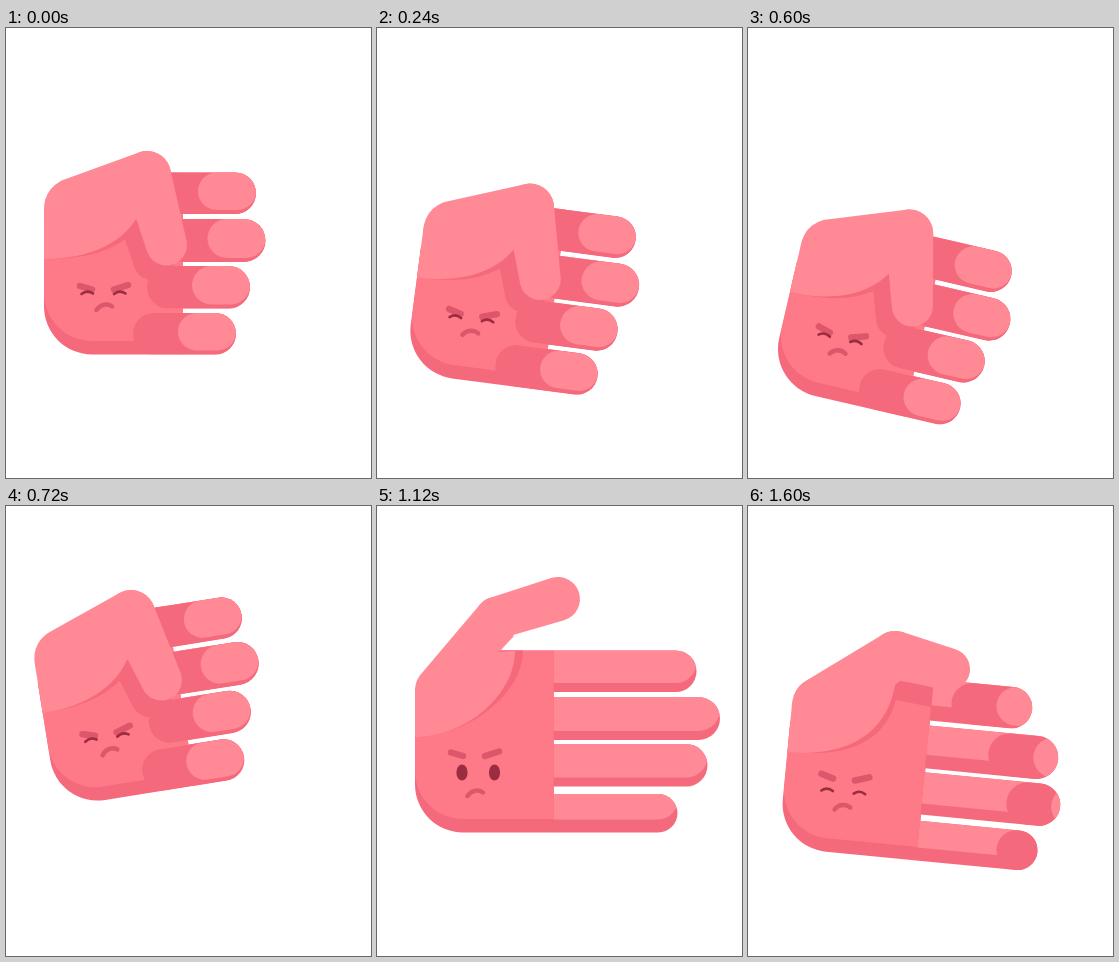
Recreate the animation shown at these times as an HTML page with a canvas. Size 365 px wide and 450 px high, loop 1640 ms.

```html
<!DOCTYPE html>
<html lang="en">
<head>
<meta charset="utf-8">
<title>Hand game</title>
<style>
html, body { margin: 0; width: 365px; height: 450px; overflow: hidden; background: #fff; }
canvas { display: block; }
</style>
</head>
<body>
<canvas id="stage" width="365" height="450"></canvas>
<script>
const g = document.getElementById('stage').getContext('2d');
const LIGHT = '#ff8995', MID = '#ff7a88', DARK = '#f5697d', BROW = '#dd566b', EYE = '#9a2d40';
const LOOP = 1640, STEP = 40, PIVOT = [85, 243];

// [time, angle in degrees] and [time, vertical shift]
const TILT = [[0, 0], [175, 14.1], [375, -13.6], [575, 14.1], [775, -14], [1100, 0]];
const LIFT = [[0, 0], [175, 47], [375, -47.4], [575, 47], [775, -48], [950, 0]];

// thumb poses: stretched, open, half closed, fist
// w wrist, k knuckle, t tip, a/c/p inner corners, e shade corner, s shade offset, b bulge of the heel
const THUMB = [
  { w: [62, 184, 24], k: [119, 112, 21], t: [181, 93, 22], a: [138, 145], c: [122, 146], p: [137, 130], e: [146, 145], s: [0, 0], b: [0] },
  { w: [62, 184, 24], k: [121, 115, 21], t: [183, 105, 22], a: [138, 145], c: [124, 146], p: [139, 136], e: [146, 146], s: [0, 4], b: [0] },
  { w: [66, 181, 28], k: [136, 124, 24], t: [191, 133, 21], a: [139, 148], c: [139, 148], p: [150, 150], e: [141, 168], s: [0, 20], b: [11] },
  { w: [68, 180, 30], k: [141, 147, 24], t: [160.5, 217, 20.5], a: [130, 191], c: [130, 191], p: [143, 205], e: [123, 209], s: [-13, 15], b: [0] }
];

// top, bottom, open reach, shortening in the fist, shade height, curl when half closed
const FINGERS = [
  { y: 144.5, b: 186, reach: 315.5, drop: 65.5, shade: 9, half: 81 },
  { y: 191, b: 234, reach: 339, drop: 79.5, shade: 9, half: 70 },
  { y: 238, b: 280.5, reach: 326.5, drop: 82.5, shade: 9, half: 54 },
  { y: 288, b: 326.5, reach: 296.5, drop: 66.5, shade: 13, half: 41 }
];
const CURL = 103, ROOT = 176.5;

const mix = (a, b, u) => a + (b - a) * u;
const span = (t, a, b) => Math.min(1, Math.max(0, (t - a) / (b - a)));
const ease = u => (1 - Math.cos(Math.PI * u)) / 2;

function track(keys, t) {
  let v = keys[0][1];
  for (let i = 1; i < keys.length; i++) {
    v = mix(v, keys[i][1], ease(span(t, keys[i - 1][0], keys[i][0])));
  }
  return v;
}

function thumbPose(q) {
  const i = Math.min(2, Math.floor(q)), pose = {};
  for (const key in THUMB[i]) {
    pose[key] = THUMB[i][key].map((v, n) => mix(v, THUMB[i + 1][key][n], q - i));
  }
  return pose;
}

function fill(color, build) {
  g.beginPath();
  build();
  g.fillStyle = color;
  g.fill();
}

function clipped(build, draw) {
  g.save();
  g.beginPath();
  build();
  g.clip();
  draw();
  g.restore();
}

function line(color, width, build) {
  g.beginPath();
  build();
  g.strokeStyle = color;
  g.lineWidth = width;
  g.lineCap = 'round';
  g.stroke();
}

function capsule([x1, y1, r1], [x2, y2, r2]) {
  const a = Math.atan2(y2 - y1, x2 - x1);
  const b = Math.acos((r1 - r2) / Math.hypot(x2 - x1, y2 - y1));
  g.arc(x1, y1, r1, a + b, a - b + Math.PI * 2);
  g.arc(x2, y2, r2, a - b, a + b);
  g.closePath();
}

function palm() {
  g.moveTo(38, 200);
  g.lineTo(38, 278.5);
  g.arc(86, 278.5, 48, Math.PI, Math.PI / 2, true);
  g.lineTo(177, 326.5);
  g.lineTo(177, 144.5);
  g.lineTo(110, 144.5);
  g.closePath();
}

function palmFace() {
  g.moveTo(38, 140);
  g.lineTo(38, 265);
  g.arc(86, 265, 48, Math.PI, Math.PI / 2, true);
  g.lineTo(178, 313);
  g.lineTo(178, 140);
  g.closePath();
}

// rounded heel of the thumb, ending at the wrist
function heel([x, y], bulge) {
  g.lineTo(x, y);
  g.bezierCurveTo(x - (y - 145) * 0.27, (y + 231) / 2 + bulge, 90 + bulge, 231, 38, 231);
  g.closePath();
}

function drawFinger(f, curl, stretch) {
  const u = curl / CURL, y = f.y - (f.shade > 9 ? 3 * u : 0), h = f.b - y, r = h / 2;
  const bend = Math.max(0, curl - 41);
  const right = f.reach + 4 * stretch - f.drop * Math.pow(bend / (CURL - 41), 1.25);
  const left = right - curl;
  const base = lift => g.roundRect(ROOT, y - lift, right - ROOT, h, [0, r, r, 0]);
  fill(DARK, () => base(0));
  clipped(() => base(0), () => fill(LIGHT, () => base(f.shade + bend * 0.16)));
  if (curl < 1) return;
  const start = Math.min(ROOT, left);
  clipped(() => g.roundRect(start, y, right - start, h, [0, r, r, 0]), () => {
    fill(DARK, () => g.roundRect(left, y, Math.max(curl, 42), h, r));
    if (curl > 45) {
      fill(LIGHT, () => g.roundRect(left + 45, y, 58, h - 4 * u, (h - 4 * u) / 2));
    }
  });
}

function drawThumb(p) {
  const [sx, sy] = p.s, [bulge] = p.b;
  const shift = ([x, y, r]) => [x + sx, y + sy, r];
  clipped(palm, () => {
    fill(DARK, () => {
      g.moveTo(38, 231);
      g.lineTo(38, 180);
      g.lineTo(p.k[0] + sx, p.k[1] + sy);
      heel(p.e, bulge);
    });
    fill(DARK, () => capsule(shift(p.k), shift(p.t)));
  });
  fill(LIGHT, () => {
    g.moveTo(38, 231);
    g.lineTo(38, p.w[1]);
    for (const [x, y] of [p.w, p.k, p.p, p.c]) g.lineTo(x, y);
    heel(p.a, bulge);
  });
  fill(LIGHT, () => capsule(p.w, p.k));
  fill(LIGHT, () => capsule(p.k, p.t));
}

function drawFace(open, brow, mouth) {
  const by = mix(260, 248.5, brow), my = mix(279, 287, mouth);
  line(BROW, 6.5, () => {
    g.moveTo(74, by - 2);
    g.lineTo(86, by + 1.5);
    g.moveTo(108, by + 1.5);
    g.lineTo(122, by - 3);
  });
  line(BROW, 4.5, () => {
    g.moveTo(90.5, my + 3);
    g.bezierCurveTo(94, my - 2.5, 101, my - 4, 106, my - 0.5);
  });
  for (const x of [81, 113.5]) {
    if (open > 0.15) {
      fill(EYE, () => g.ellipse(x + 4 * open, 266.5, 5.6, 8 * open, 0, 0, Math.PI * 2));
    } else {
      line(EYE, 2.6, () => {
        g.moveTo(x - 5.5, 266);
        g.quadraticCurveTo(x, 261.5, x + 6, 265.5);
      });
    }
  }
}

function draw(t) {
  const close = span(t, 1440, 1600), drop = close * close;
  const tilt = track(TILT, t) + 5.5 * drop;
  const lift = track(LIFT, t) + 19.5 * drop;
  const stretch = t < 1120
    ? 1.5 * ease(span(t, 1000, 1080)) - 0.5 * span(t, 1080, 1120)
    : 1 - ease(span(t, 1120, 1290));
  const thumb = t < 1120
    ? 3 * (1 - ease(span(t, 900, 1090)))
    : ease(span(t, 1120, 1290)) + Math.pow(close, 1.3);
  const wake = span(t, 800, 950), shut = ease(span(t, 1440, 1590));

  g.fillStyle = '#fff';
  g.fillRect(0, 0, 365, 450);
  g.save();
  g.translate(PIVOT[0], PIVOT[1] + lift);
  g.rotate(tilt * Math.PI / 180);
  g.translate(-PIVOT[0], -PIVOT[1]);

  fill(DARK, palm);
  clipped(palm, () => fill(MID, palmFace));
  FINGERS.forEach((f, i) => {
    const begin = 900 + (3 - i) * 12;
    const curl = t < 1120
      ? CURL * (1 - ease(span(t, begin, begin + 150)))
      : f.half * Math.pow(close, 1.2);
    drawFinger(f, curl, stretch);
  });
  drawThumb(thumbPose(thumb));
  drawFace(wake * (1 - shut), wake - 0.25 * shut, wake - 0.8 * shut);
  g.restore();
}

const begin = performance.now();
function tick() {
  const t = (performance.now() - begin) % LOOP;
  draw(Math.floor(t / STEP) * STEP);
  requestAnimationFrame(tick);
}
tick();
</script>
</body>
</html>
```
